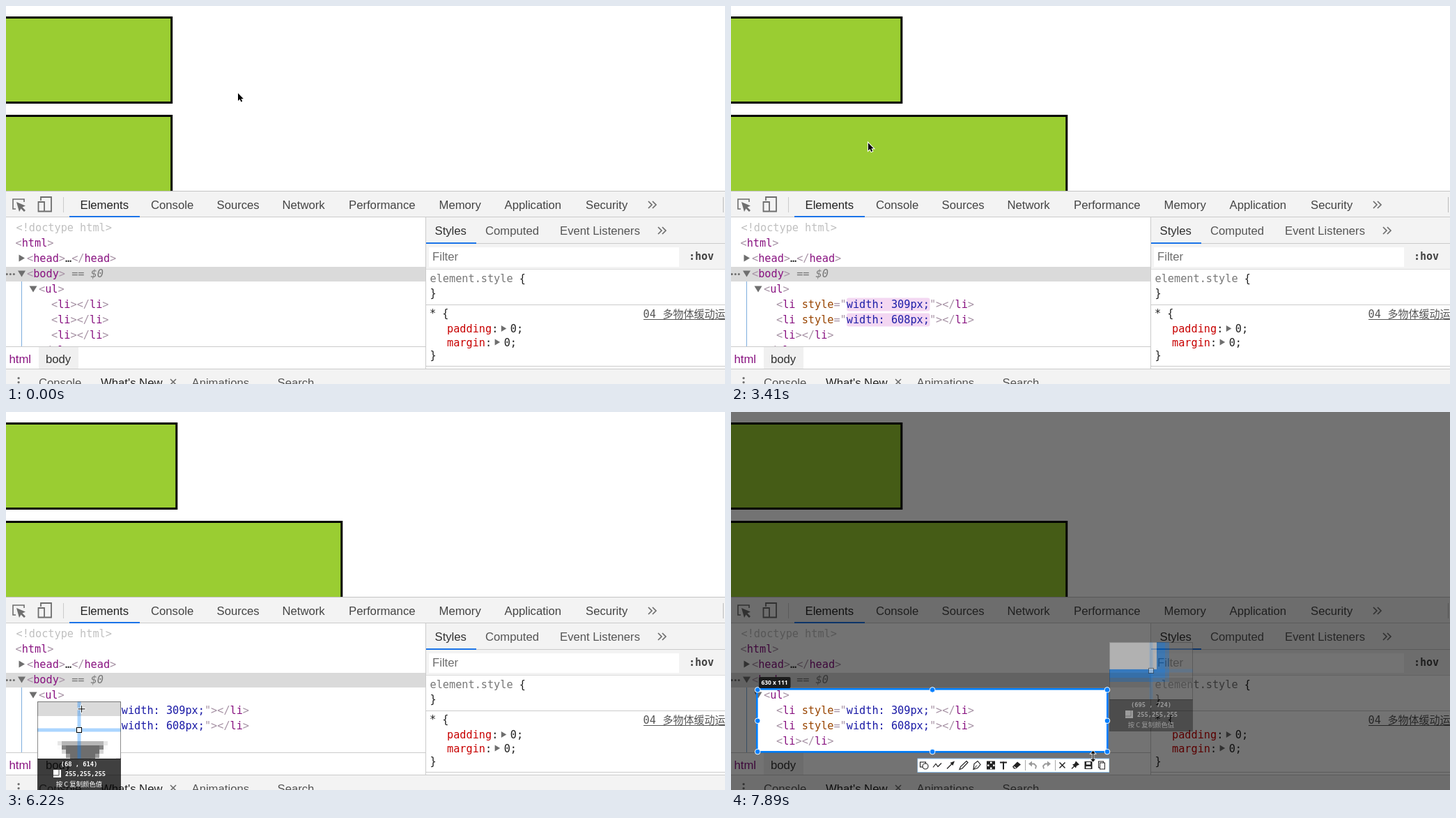
Animation, 1032 px wide and 542 px high, one loop 8000 ms. Source, as an HTML page with a canvas:

```html
<!DOCTYPE html>
<html lang="en">
<head>
<meta charset="utf-8">
<title>Easing boxes in the inspector</title>
<style>
html, body { margin: 0; width: 100%; height: 100%; overflow: hidden; background: #fff; }
canvas { display: block; }
</style>
</head>
<body>
<canvas id="stage" width="1032" height="542"></canvas>
<script>
const canvas = document.getElementById('stage');
const ctx = canvas.getContext('2d');
const LOOP = 8000;
const UI = '16.7px "Liberation Sans", Arial, sans-serif';
const MONO = '15.22px "DejaVu Sans Mono", monospace';
const SMALL = 'bold 8.75px "DejaVu Sans Mono", monospace';
const CJK = '"Noto Sans CJK SC", "Noto Sans CJK", sans-serif';
const C = {
  tag: '#881280', mark: '#a894a6', attr: '#994500', value: [26, 26, 166],
  ink: '#222', ui: '#303030', icon: '#6e6e6e', line: '#cbcbcb', bar: '#f3f3f3',
  accent: '#1a73e8', red: '#c80000', blue: '#007fff', green: '#9acd32'
};

// ---------- drawing helpers ----------
function rect(x, y, w, h, color) {
  ctx.fillStyle = color;
  ctx.fillRect(x, y, w, h);
}
function text(str, x, y, color = C.ui, font = UI, align = 'left') {
  ctx.font = font;
  ctx.fillStyle = color;
  ctx.textAlign = align;
  ctx.fillText(str, x, y);
}
function runs(x, y, parts) {
  for (const [str, color, font = MONO] of parts) {
    text(str, x, y, color, font);
    x += ctx.measureText(str).width;
  }
}
function trace(points, closed) {
  ctx.beginPath();
  points.forEach(([x, y], i) => i ? ctx.lineTo(x, y) : ctx.moveTo(x, y));
  if (closed) ctx.closePath();
}
function poly(points, color) {
  trace(points, true);
  ctx.fillStyle = color;
  ctx.fill();
}
function stroke(points, color, width = 1, closed = false) {
  trace(points, closed);
  ctx.strokeStyle = color;
  ctx.lineWidth = width;
  ctx.stroke();
}
function rounded(x, y, w, h, r, color) {
  ctx.beginPath();
  ctx.roundRect(x, y, w, h, r);
  ctx.fillStyle = color;
  ctx.fill();
}
function at(x, y, draw) {
  ctx.save();
  ctx.translate(x, y);
  draw();
  ctx.restore();
}
function clipped(x, y, w, h, draw) {
  ctx.save();
  ctx.beginPath();
  ctx.rect(x, y, w, h);
  ctx.clip();
  draw();
  ctx.restore();
}
const arrowRight = (x, y) => poly([[x, y - 5], [x + 8.5, y], [x, y + 5]], C.icon);
const arrowDown = (x, y) => poly([[x - 5.5, y - 4], [x + 5.5, y - 4], [x, y + 5]], C.icon);
function chevrons(x, y) {
  for (const dx of [0, 6]) stroke([[x + dx, y - 5], [x + dx + 5, y], [x + dx, y + 5]], C.icon, 1.7);
}

// ---------- motion ----------
const clamp = v => Math.max(0, Math.min(1, v));
const mix = (a, b, k) => a.map((v, i) => v + (b[i] - v) * k);
const rgb = (c, a = 1) => `rgba(${c.map(Math.round).join()},${a})`;

const BURSTS = [0, 450, 1920, 4600, 5770, 6850];
function recordedTime(t) {
  const start = BURSTS.filter(b => b <= t).pop();
  return start + Math.floor((t - start) / 145.7) * 145.7;
}

const PATH = [
  [320, 333, 125], [460, 246, 106], [640, 201, 96], [1860, 201, 96],
  [1970, 200, 139], [2110, 198, 157], [2330, 196.5, 196.5], [4650, 197.4, 196.1],
  [5100, 110, 300], [5510, 43, 385], [5750, 38.2, 398.4], [6100, 38.2, 398.4],
  [6220, 117, 428], [6370, 205, 462], [6550, 350, 494], [6730, 475, 497.3],
  [6850, 504, 491.5], [7130, 534, 489], [7450, 540, 487], [7590, 539.2, 486.3],
  [7710, 539.2, 486.3], [7770, 537, 486.3], [7885, 517, 495]
];
function pointer(t) {
  const next = PATH.findIndex(k => k[0] > t);
  if (next === 0) return PATH[0].slice(1);
  if (next < 0) return PATH[PATH.length - 1].slice(1);
  const a = PATH[next - 1], b = PATH[next];
  return mix(a.slice(1), b.slice(1), (t - a[0]) / (b[0] - a[0]));
}

const ease = (from, to, start, t) =>
  t < start ? from : to + (from - to) * Math.exp((start - t) / 90);
const ITEMS = [
  { enter: 488, leave: 1970, lag: 137, settled: [1078, 2600] },
  { enter: 2110, leave: Infinity, lag: 62, settled: [2640] }
];
const itemWidth = (item, t) =>
  t < item.leave ? ease(300, 608, item.enter, t) : ease(608, 309, item.leave, t);

const LAG = 120, DIM = 6300, RELEASE = 7710;
const toScreen = ([x, y]) => [Math.floor((x + 16) / .796), Math.floor((y + 91) / .797)];

// ---------- page ----------
function box(top, width) {
  const edge = 1.4 + .7925 * width;
  rect(-5, top, edge + 5, 125, '#000');
  rect(-5, top + 3, edge + 2, 119, C.green);
}
function page(t) {
  rect(0, 0, 1032, 542, '#fff');
  box(15, itemWidth(ITEMS[0], t));
  box(156, itemWidth(ITEMS[1], t));
}

// ---------- inspector ----------
function listItem(item, y, t) {
  const open = [['<', C.mark], ['li', C.tag]];
  const close = [['></', C.mark], ['li', C.tag], ['>', C.mark]];
  if (!item || t < item.enter + item.lag) return runs(65, y, [...open, ...close]);

  const second = t >= item.leave;
  const age = t - item.settled[second ? 1 : 0];
  const k = 1 - Math.pow(1 - clamp(age / 1050), 3);
  const alpha = 1 - clamp((age - 1050) / 150);
  if (alpha > 0)
    rounded(166, y - 14.5, 119.5, 19, 3, rgb(mix([160, 56, 155], [245, 219, 244], k), alpha));
  const shown = Math.round(itemWidth(item, t - item.lag));
  runs(65, y, [...open, [' style', C.attr], ['="', C.mark],
    [`width: ${shown}px;`, rgb(mix([255, 255, 255], C.value, k))], ['"', C.mark], ...close]);
}
function element(x, y, name, tail = []) {
  runs(x, y, [['<', C.mark], [name, C.tag], ['>', C.mark], ...tail]);
}
function elementsPanel(t) {
  rect(0, 303, 602, 185, '#fff');
  rect(0, 374, 602, 21, '#dadada');
  rect(22, 395, 1, 93, '#7cadde');
  text('<!doctype html>', 14.5, 323, '#c0c0c0', MONO);
  element(13.5, 345, 'html');
  arrowRight(18.5, 361.5);
  element(30, 367, 'head', [['…', C.ink], ['</', C.mark], ['head', C.tag], ['>', C.mark]]);
  for (const x of [1, 6, 11]) rounded(x - 1.2, 383, 3, 3, 1.5, C.icon);
  arrowDown(22.5, 383.5);
  element(30, 389, 'body', [[' == ', '#777'], ['$0', '#777', 'italic ' + MONO]]);
  arrowDown(39, 405.5);
  element(47, 411, 'ul');
  [...ITEMS, null].forEach((item, i) => listItem(item, 433 + 22 * i, t));
  clipped(0, 480, 602, 8, () =>
    runs(47, 499, [['</', C.mark], ['ul', C.tag], ['>', C.mark]]));
  rect(0, 488, 602, 33, '#fff');
  rect(0, 488, 602, 1, C.line);
  rect(47, 489, 57, 31, '#f0f0f0');
  text('html', 4.5, 512, C.tag);
  text('body', 57, 512);
}
function property(name, y) {
  runs(633, y, [[name, C.red], [':', C.ink]]);
  const x = 633 + (name.length + 1) * 9.163;
  poly([[x + 4.5, y - 10], [x + 12, y - 5.5], [x + 4.5, y - 1]], C.icon);
  text('0;', x + 17.5, y, C.ink, MONO);
}
function stylesPanel() {
  rect(603, 303, 429, 74, C.bar);
  rect(603, 340, 429, 1, C.line);
  rect(603, 339, 72, 2, C.accent);
  text('Styles', 615.5, 328);
  text('Computed', 688, 328, '#555');
  text('Event Listeners', 795, 328, '#555');
  chevrons(936, 322);
  rect(607, 346, 359, 28, '#fff');
  text('Filter', 612, 365, '#6d6d6d');
  text(':hov', 980, 364, '#444', 'bold 15px "DejaVu Sans Mono", monospace');
  rect(603, 377, 429, 1, '#ddd');
  rect(603, 378, 429, 142, '#fff');
  runs(608.5, 396, [['element.style', '#777'], [' {', C.ink]]);
  text('}', 608.5, 417, C.ink, MONO);
  rect(603, 428, 429, 1, C.line);
  text('* {', 608, 446, C.ink, MONO);
  text('04', 914.5, 447, '#555', MONO);
  text('多物体缓动运动', 942.5, 447, '#555', '15px ' + CJK);
  rect(915, 449, 117, 1, '#555');
  property('padding', 468);
  property('margin', 487.5);
  text('}', 608.5, 506, C.ink, MONO);
  rect(603, 516, 429, 1, C.line);
  rect(602, 303, 1, 217, C.line);
}
function tabBar() {
  rect(0, 265, 1032, 38, C.bar);
  rect(0, 265, 1032, 1, '#c4c4c4');
  rect(0, 302, 1032, 1, C.line);
  rect(91, 301, 101, 2, C.accent);
  stroke([[14, 291], [10, 291], [10, 277], [26, 277], [26, 281]], C.icon, 1.6);
  poly([[15, 281], [28, 286.5], [23.5, 288.5], [28, 293], [26, 295], [21.5, 290.5], [19, 295]], C.icon);
  stroke([[50, 279], [50, 274], [65, 274], [65, 294.5], [56, 294.5]], C.icon, 1.8);
  stroke([[46.5, 281], [55, 281], [55, 294.5], [46.5, 294.5]], C.icon, 1.8, true);
  rect(82, 274, 1, 22, C.line);
  rect(1029, 274, 1, 22, '#bbb');
  const tabs = { Elements: 106.5, Console: 208, Sources: 302.5, Network: 396.5,
    Performance: 492, Memory: 621.5, Application: 715.5, Security: 832 };
  for (const [name, x] of Object.entries(tabs))
    text(name, x, 291, name === 'Elements' ? C.ink : '#444');
  chevrons(922, 285);
}
function drawer() {
  rect(0, 520, 1032, 22, C.bar);
  rect(0, 520, 1032, 1, C.line);
  for (const y of [532, 538]) rounded(16.5, y, 3.2, 3.2, 1.6, C.icon);
  text('Console', 47, 545.5, '#555');
  text("What's New", 136, 545.5, C.ink);
  stroke([[236, 535], [244, 543]], C.icon, 1.6);
  stroke([[244, 535], [236, 543]], C.icon, 1.6);
  text('Animations', 266.5, 545.5, '#555');
  text('Search', 389.5, 545.5, '#555');
}

// ---------- screenshot tool ----------
const ORIGIN = [38.2, 398.4];
function selection(corner) {
  const [x, y] = ORIGIN.map(Math.round), [r, b] = corner.map(v => Math.round(v));
  ctx.beginPath();
  ctx.rect(0, 0, 1032, 542);
  ctx.rect(x, y, r - x, b - y);
  ctx.fillStyle = 'rgba(0,0,0,.55)';
  ctx.fill('evenodd');
  ctx.strokeStyle = C.blue;
  ctx.lineWidth = 2.6;
  ctx.strokeRect(x - .7, y - .7, r - x + 2, b - y + 2);
}
function handles(corner) {
  const [x, y] = ORIGIN, [r, b] = corner.map(v => v + .8);
  const cx = (x + r) / 2, cy = (y + b) / 2;
  for (const [hx, hy] of [[x, y], [cx, y], [r, y], [x, cy], [r, cy], [x, b], [cx, b], [r, b]]) {
    ctx.beginPath();
    ctx.arc(hx, hy, 3.8, 0, 7);
    ctx.fillStyle = C.blue;
    ctx.fill();
    ctx.strokeStyle = '#fff';
    ctx.lineWidth = 1;
    ctx.stroke();
  }
  const a = toScreen(ORIGIN), z = toScreen(corner);
  rounded(40, 380, 45.5, 16, 2, '#1c1c1c');
  text(`${z[0] - a[0] + 1} x ${z[1] - a[1] + 1}`, 62.5, 391, '#fff',
    'bold 8.4px "Noto Sans", sans-serif', 'center');
}
function magnifier(point, alpha) {
  const below = point[1] < 440;
  const x = Math.round(point[0] + (below ? 7 : 5));
  const y = Math.round(point[1] + (below ? 17 : -156));
  const overGreen = point[1] < 265;
  const [sx, sy] = toScreen(point);
  ctx.save();
  ctx.globalAlpha = alpha;
  ctx.imageSmoothingEnabled = false;
  ctx.drawImage(canvas, point[0] - 10, point[1] - 6.83, 20, 13.66, x, y, 120, 82);
  const guide = 'rgba(0,127,255,.33)';
  rect(x + 57.5, y, 5, 82, guide);
  rect(x, y + 38.5, 57.5, 5, guide);
  rect(x + 62.5, y + 38.5, 57.5, 5, guide);
  ctx.strokeStyle = 'rgba(0,0,0,.45)';
  ctx.lineWidth = 1;
  ctx.strokeRect(x + .5, y + .5, 119, 82);
  rect(x + 56.5, y + 37.5, 7, 7, '#fff');
  ctx.strokeStyle = '#000';
  ctx.strokeRect(x + 56.5, y + 37.5, 7, 7);
  rect(x, y + 82, 120, 46, 'rgba(0,0,0,.75)');
  text(`(${sx} , ${sy})`, x + 60, y + 93, '#fff', SMALL, 'center');
  rect(x + 23, y + 98, 11, 11, overGreen ? '#a5ca4f' : '#fff');
  stroke([[x + 31, y + 98], [x + 31, y + 106], [x + 23, y + 106]], '#444', 1);
  text(overGreen ? '165,202, 79' : '255,255,255', x + 69, y + 106.5, '#fff', SMALL, 'center');
  text('按 C 复制颜色值', x + 60, y + 121.5, '#fff', '9.4px ' + CJK, 'center');
  ctx.restore();
}
function toolbar() {
  rect(267.5, 496.5, 275.5, 20.5, '#8fc3f5');
  rect(268, 497.5, 274.5, 18.5, '#fff');
  const ink = '#222', grey = '#999';
  const icon = (x, draw) => at(x, 506.5, draw);
  icon(277, () => {
    ctx.strokeStyle = ink;
    ctx.lineWidth = 1.1;
    ctx.strokeRect(-5.5, -4.5, 8, 7);
    ctx.beginPath();
    ctx.arc(2, 1.5, 4, 0, 7);
    ctx.fillStyle = '#fff';
    ctx.fill();
    ctx.stroke();
  });
  icon(296, () => stroke([[-6, 3], [-2, -2], [1, 2], [6, -3]], ink, 1.2));
  icon(315, () => {
    stroke([[-5, 5], [3, -3]], ink, 1.3);
    poly([[6, -6], [-.5, -3.5], [3.5, .5]], ink);
  });
  icon(334, () => stroke([[-6, 6], [-4.5, 2], [4, -6], [6, -4], [-2, 4.5]], ink, 1.2, true));
  icon(353, () => {
    stroke([[-5, 6], [-4, -2], [1, -6], [5, -1], [1, 4]], ink, 1.2, true);
    stroke([[-5, 6], [0, 0]], ink, 1);
  });
  icon(373, () => {
    rect(-6, -6, 12, 12, ink);
    for (const [x, y] of [[-1, -5], [-5, -1], [3, -1], [-1, 3]]) rect(x, y, 2.5, 2.5, '#fff');
  });
  icon(391, () => { rect(-5, -5, 10, 2, ink); rect(-1, -5, 2, 11, ink); });
  icon(410, () => {
    poly([[-6, 2], [1, -5], [6, -1], [-1, 5], [-4, 5]], ink);
    stroke([[-4, 2], [-1, 4]], '#fff', 1.5);
  });
  for (const x of [422, 465]) rect(x, 499, 1, 15, '#aaa');
  for (const [x, s] of [[433, 1], [453, -1]]) icon(x, () => {
    ctx.scale(s, 1);
    poly([[-6, -2], [-1, -6], [-1, 2]], grey);
    stroke([[-2, -2], [2, -2], [5, 1], [4, 5]], grey, 1.8);
  });
  icon(475.5, () => {
    stroke([[-4, -4], [4, 4]], ink, 1.5);
    stroke([[4, -4], [-4, 4]], ink, 1.5);
  });
  icon(494, () => {
    poly([[1, -6], [6, -1], [2, 1], [1, 4], [-4, -1], [-1, -2]], ink);
    stroke([[-5, 5], [0, 0]], ink, 1.2);
  });
  icon(513, () => {
    rect(-5.5, -5.5, 11, 11, ink);
    rect(-3, -4.5, 6, 3.5, '#fff');
    rect(-3.5, 1.5, 7, 3, '#fff');
  });
  icon(532, () => {
    ctx.strokeStyle = ink;
    ctx.lineWidth = 1;
    ctx.strokeRect(-4.5, -5.5, 7, 9);
    rect(-2.5, -3.5, 7, 9, '#fff');
    ctx.strokeRect(-2.5, -3.5, 7, 9);
  });
}

// ---------- pointers ----------
function arrowPointer() {
  const shape = [[0, 0], [0, 11], [2.6, 8.6], [4.4, 12.6], [6.2, 11.8], [4.5, 8], [7.8, 8]];
  stroke(shape, '#fff', 2, true);
  poly(shape, '#000');
}
function crossPointer() {
  for (const [color, len, width] of [['#fff', 6, 3], ['#111', 5, 1.1]]) {
    stroke([[-len, 1], [len, 1]], color, width);
    stroke([[0, 1 - len], [0, 1 + len]], color, width);
  }
}
function resizePointer(angle) {
  ctx.rotate(angle);
  const shape = [[0, -8], [3.5, -4], [.7, -4], [.7, 4], [3.5, 4], [0, 8],
    [-3.5, 4], [-.7, 4], [-.7, -4], [-3.5, -4]];
  stroke(shape, '#fff', 1.6, true);
  poly(shape, '#111');
}
function drawPointer(t) {
  const [x, y] = pointer(t);
  at(x, y, () => {
    if (t < 4600) arrowPointer();
    else if (t < DIM) crossPointer();
    else resizePointer(t < 7800 ? -Math.PI / 4 : 0);
  });
}

function render(now) {
  const t = recordedTime(now);
  page(t);
  elementsPanel(t);
  stylesPanel();
  tabBar();
  drawer();
  const dimmed = t >= DIM;
  const corner = pointer(Math.min(t, RELEASE) - LAG);
  if (dimmed) selection(corner);
  if (t >= 4600) {
    const alpha = t < RELEASE ? clamp((t - 4540) / 190) : clamp((8000 - t) / 290);
    magnifier(pointer(t - LAG), alpha);
  }
  if (dimmed) handles(corner);
  if (t >= RELEASE) toolbar();
  drawPointer(t);
}

const begin = performance.now();
function tick() {
  render((performance.now() - begin) % LOOP);
  requestAnimationFrame(tick);
}
tick();
</script>
</body>
</html>
```
